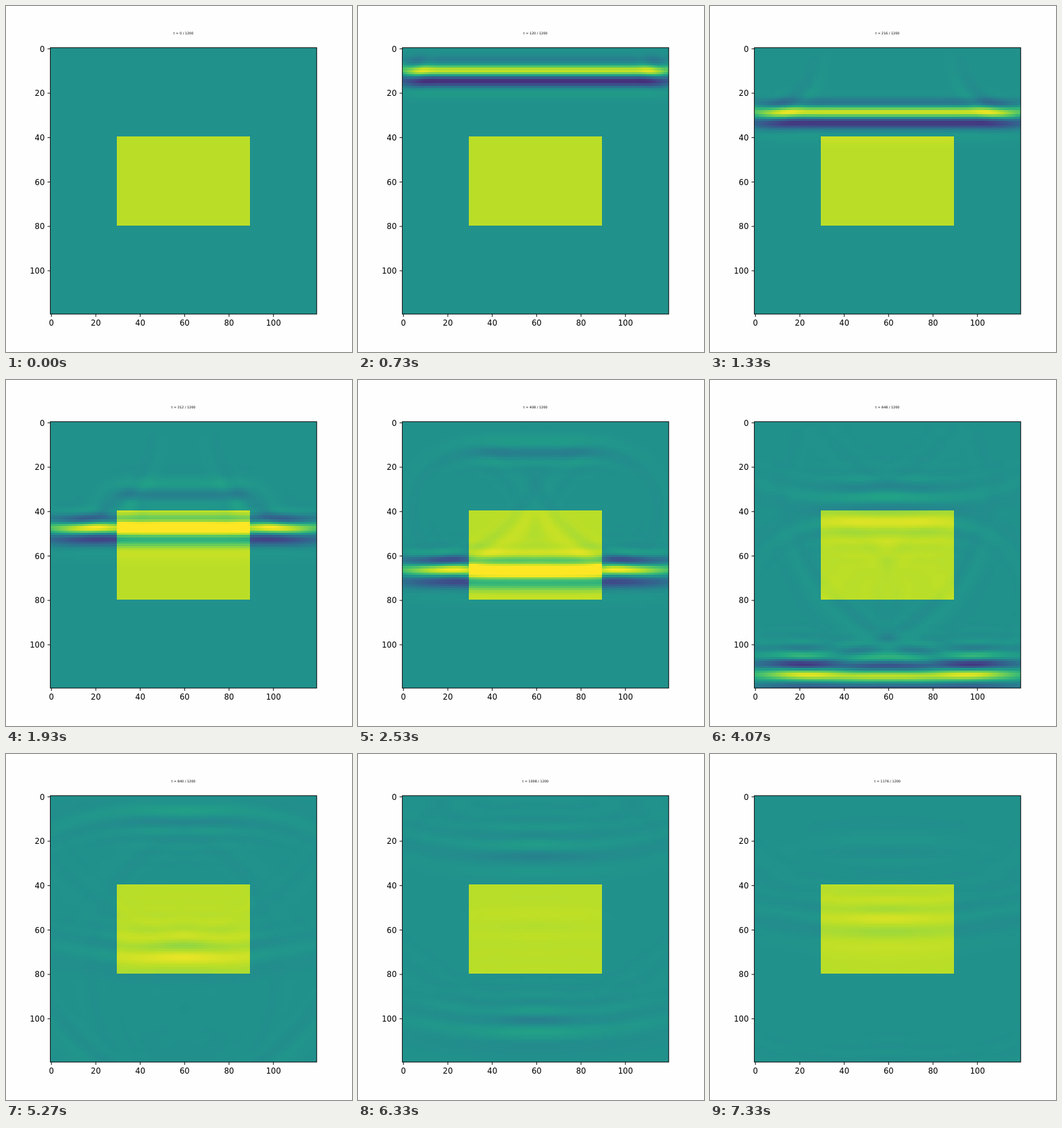
An HTML page with a canvas that plays this animation: 512 by 512 pixels, repeating every 7.54 s.

```html
<!DOCTYPE html>
<html lang="en">
<head>
<meta charset="utf-8">
<title>Plane wave through a block</title>
<style>
  html, body { margin: 0; width: 100%; height: 100%; overflow: hidden; background: #fefefe; }
  canvas, svg { position: absolute; left: 0; top: 0; width: 512px; height: 512px; }
  text { font-family: "DejaVu Sans", Verdana, sans-serif; font-size: 11.6px; fill: #000; }
  #title { font-size: 4.9px; text-anchor: middle; }
  .axis { fill: none; stroke: #000; stroke-width: 0.95; }
</style>
</head>
<body>
<canvas id="stage" width="512" height="512"></canvas>
<svg id="axes" viewBox="0 0 512 512">
  <text id="title" x="262.6" y="41.8"></text>
</svg>
<script>
const LOOP = 7540, FRAMES = 50, STEPS = 24, TOTAL = 1200;
const CELLS = 120, PAD = 30, N = CELLS + 2 * PAD;
const LEFT = 65.6, TOP = 61.7, SIDE = 394.2, CELL = SIDE / CELLS;
const BLOCK = { x0: 30, x1: 90, y0: 40, y1: 80, eps: 1.32, mu: 0.72, tint: 0.79 };
const COURANT = 0.2;

const inBlock = (x, y) => x >= BLOCK.x0 && x < BLOCK.x1 && y >= BLOCK.y0 && y < BLOCK.y1;

// Sine under a Gaussian, fed in along the top row
const pulse = t => {
  const s = t - 58;
  return Math.sin(2 * Math.PI * s / 59) * Math.exp(-s * s / 800);
};

// Two-dimensional wave solver with an absorbing rim around the visible cells
function createField() {
  const size = N * N;
  const make = () => new Float64Array(size);
  const e = make(), hx = make(), hy = make();
  const ce = make(), ch = make(), damp = make();
  const depth = i => Math.max(0, PAD - i, i - (N - 1 - PAD)) / PAD;

  for (let j = 0; j < N; j++) {
    for (let i = 0; i < N; i++) {
      const p = j * N + i;
      const inside = inBlock(i - PAD, j - PAD);
      ce[p] = COURANT / (inside ? BLOCK.eps : 1);
      ch[p] = COURANT / (inside ? BLOCK.mu : 1);
      damp[p] = 1 - 0.08 * Math.min(1, depth(i) ** 2 + depth(j) ** 2);
    }
  }

  function step(t) {
    for (let p = 0; p < size - N; p++) {
      hx[p] = damp[p] * (hx[p] - ch[p] * (e[p + N] - e[p]));
      hy[p] = damp[p] * (hy[p] + ch[p] * (e[p + 1] - e[p]));
    }
    for (let p = N; p < size; p++) {
      e[p] = damp[p] * (e[p] + ce[p] * (hy[p] - hy[p - 1] - hx[p] + hx[p - N]));
    }
    e.fill(pulse(t), PAD * N + PAD, PAD * N + PAD + CELLS);
  }

  function snapshot() {
    const view = new Float32Array(CELLS * CELLS);
    for (let y = 0; y < CELLS; y++) {
      const start = (y + PAD) * N + PAD;
      view.set(e.subarray(start, start + CELLS), y * CELLS);
    }
    return view;
  }

  return { step, snapshot };
}

function simulate() {
  const field = createField();
  const views = [field.snapshot()];
  for (let t = 1; t <= (FRAMES - 1) * STEPS; t++) {
    field.step(t);
    if (t % STEPS === 0) views.push(field.snapshot());
  }
  return views;
}

const palette = ["440154", "482475", "414487", "355f8d", "2a788e", "21918c",
  "22a884", "44bf70", "7ad151", "bddf26", "fde725"]
  .map(hex => [0, 2, 4].map(i => parseInt(hex.slice(i, i + 2), 16)));

function colour(value) {
  const pos = Math.min(1, Math.max(0, value)) * (palette.length - 1);
  const i = Math.min(palette.length - 2, Math.floor(pos));
  return palette[i].map((c, k) => c + (palette[i + 1][k] - c) * (pos - i));
}

const axes = document.getElementById("axes");
const title = document.getElementById("title");

function add(tag, attrs, text = "") {
  const node = document.createElementNS("http://www.w3.org/2000/svg", tag);
  for (const key in attrs) node.setAttribute(key, attrs[key]);
  node.textContent = text;
  axes.append(node);
}

function drawAxes() {
  const bottom = TOP + SIDE;
  add("rect", { class: "axis", x: LEFT, y: TOP, width: SIDE, height: SIDE });
  for (let v = 0; v <= 100; v += 20) {
    const offset = (v + 0.5) * CELL;
    const x = LEFT + offset, y = TOP + offset;
    add("path", { class: "axis", d: `M${x} ${bottom}v4.1M${LEFT} ${y}h-4.1` });
    add("text", { x, y: 473, "text-anchor": "middle" }, v);
    add("text", { x: 57.3, y: y + 4.2, "text-anchor": "end" }, v);
  }
}

const ctx = document.getElementById("stage").getContext("2d");
ctx.imageSmoothingEnabled = false;
const tile = document.createElement("canvas");
tile.width = tile.height = CELLS;
const tileCtx = tile.getContext("2d");
const image = tileCtx.createImageData(CELLS, CELLS);

function draw(frame) {
  const view = views[frame];
  for (let p = 0; p < view.length; p++) {
    const tint = inBlock(p % CELLS, Math.floor(p / CELLS)) ? BLOCK.tint : 0;
    const [r, g, b] = colour(0.5 + 0.5 * (view[p] + tint));
    image.data.set([r, g, b, 255], p * 4);
  }
  tileCtx.putImageData(image, 0, 0);
  ctx.clearRect(0, 0, 512, 512);
  ctx.drawImage(tile, LEFT, TOP, SIDE, SIDE);
  title.textContent = `t = ${frame * STEPS} / ${TOTAL}`;
}

// After the first picture, every four share a 600 ms rhythm
function frameAt(ms) {
  if (ms < 130) return 0;
  const beat = Math.floor((ms - 130) / 600);
  const rest = (ms - 130) % 600;
  const sub = [200, 340, 470].filter(start => rest >= start).length;
  return Math.min(FRAMES - 1, 1 + beat * 4 + sub);
}

drawAxes();
const views = simulate();
const begin = performance.now();
let shown = -1;

function tick() {
  const frame = frameAt(Math.max(0, performance.now() - begin) % LOOP);
  if (frame !== shown) draw(shown = frame);
  requestAnimationFrame(tick);
}
tick();
</script>
</body>
</html>
```
